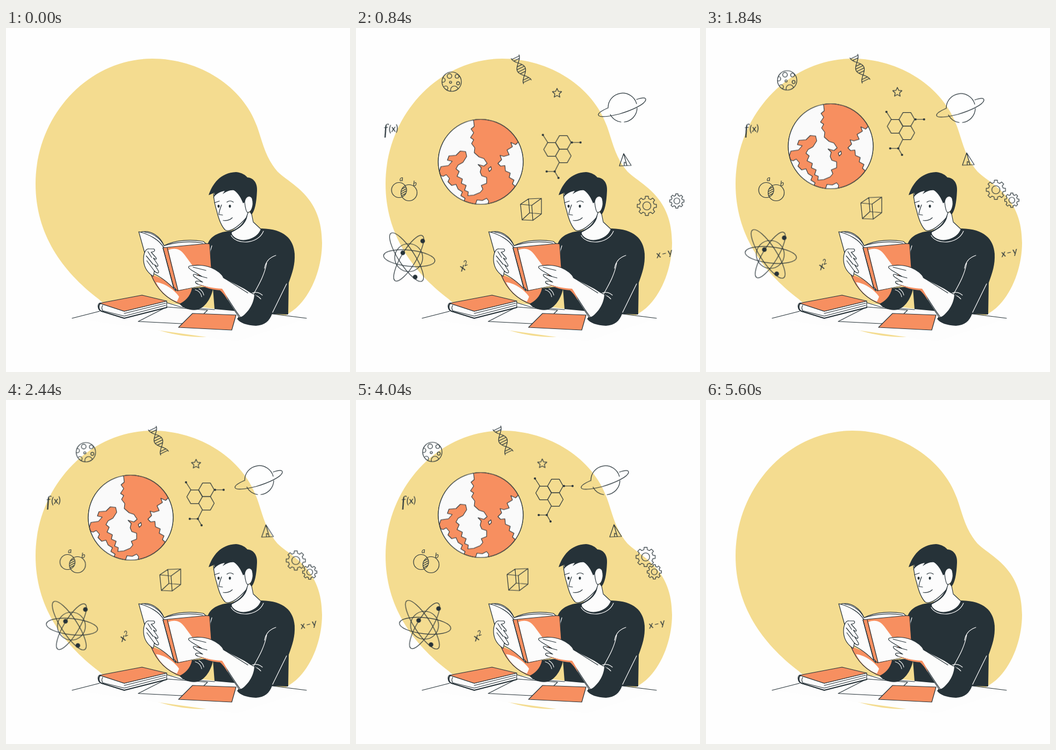
An HTML page for the animation above (6 s loop, 640 by 640 pixels).

```html
<!DOCTYPE html>
<html lang="en">
<head>
<meta charset="utf-8">
<title>Reading</title>
<style>
  html, body { margin: 0; width: 100%; height: 100%; overflow: hidden; background: #fefefe; }
  svg { display: block; width: 100vw; height: 100vh; }
  .line { fill: none; stroke: #263238; stroke-width: 1.2; stroke-linejoin: round; stroke-linecap: round; }
  .skin { fill: #fcfcfc; stroke: #263238; stroke-width: 1.2; stroke-linejoin: round; }
  .dark { fill: #263238; }
  .orange { fill: #f78f60; stroke: #263238; stroke-width: 1.2; stroke-linejoin: round; }
  .shade { fill: #f78f60; }
  .crease { fill: none; stroke: #fcfcfc; stroke-width: 1.2; stroke-linecap: round; }
  .thick { stroke-width: 2; }
  .dot { fill: #263238; stroke: none; }
  #icons text { font-family: Lato, "Open Sans", sans-serif; font-style: italic; fill: #263238; stroke: none; }
  #icons .serif { font-family: "Liberation Serif", "Noto Serif", serif; }
</style>
</head>
<body>
<svg viewBox="0 0 640 640" xmlns="http://www.w3.org/2000/svg">
  <defs>
    <clipPath id="disc"><circle cx="232" cy="217.5" r="79"/></clipPath>
    <clipPath id="moonDisc"><circle cx="146" cy="97" r="18"/></clipPath>
    <clipPath id="vennLeft"><circle cx="117" cy="301.5" r="14"/></clipPath>
    <clipPath id="vennRight"><circle cx="135.5" cy="306.5" r="15"/></clipPath>
  </defs>

  <path fill="#f4dc90" d="M55 290C55 163 153 57 272 57C360 57 441 109 467 183C478 214 482 240 505 267C530 292 588 312 588 400C588 450 565 508 526 531C490 560 440 575 368 575C340 575 315 571 290 564C240 550 200 530 172 504C104 452 55 383 55 290Z"/>

  <g id="icons" class="line">
    <g id="earth">
      <circle cx="232" cy="217.5" r="79" fill="#f78f60"/>
      <g clip-path="url(#disc)" fill="#fafafa" stroke-width="1.1">
        <g transform="translate(0 -31.5)">
          <path d="M218 165L220 183L214 188L219 195L213 204L219 208L215 215L221 223L220 232L229 240L238 243L244 252L238 257L227 254L233 260L231 268L234 275L243 278L243 289L233 293L236 300L231 306L219 311L208 312L209 305L202 302L205 293L196 289L198 281L188 276L192 267L186 262L190 255L199 250L206 239L204 230L194 229L186 237L173 238L170 246L179 248L172 256L158 258L155 267L140 268L140 165Z"/>
          <path d="M315 211L301 213L297 217L288 213L291 221L281 227L285 236L275 239L268 237L271 245L264 252L269 257L277 256L278 266L287 270L285 278L294 283L291 290L298 296L315 280Z"/>
          <path d="M150 272L162 276L168 273L174 280L171 286L178 293L186 291L190 300L198 305L195 312L203 317L200 324L180 330Z"/>
          <path d="M221 332L225 320L235 321L243 317L247 322L244 332Z"/>
          <path d="M246 262L251 258L252 263L248 267Z"/>
        </g>
      </g>
      <circle cx="232" cy="217.5" r="79"/>
    </g>

    <g id="moon">
      <circle cx="146" cy="97" r="18"/>
      <g clip-path="url(#moonDisc)">
        <circle cx="142" cy="86.500" r="4.300"/><circle cx="156" cy="87" r="3.500"/>
        <circle cx="144" cy="98" r="2"/><circle cx="158" cy="100" r="2.800"/>
        <circle cx="151" cy="112" r="7"/><circle cx="130" cy="94" r="4"/>
        <circle cx="135" cy="109" r="4"/>
      </g>
    </g>

    <path id="dna"/>
    <path id="star"/>

    <g id="planet">
      <path d="M441 150A27 27 0 0 1 494 142M495 150A27 27 0 0 1 471 176M465 176A27 27 0 0 1 445 162"/>
      <path d="M494 134C505 130 512 130 511 135C509 143 486 154 462 161C442 166 424 168 423 163C422 159 431 154 440 150"/>
    </g>

    <g id="molecule">
      <path id="rings"/>
      <path d="M343 164L334 150M386 164H404M364 202L356 218H341M356 218L363 230"/>
      <g class="dot">
        <circle cx="334" cy="150" r="2"/><circle cx="388" cy="164" r="2"/><circle cx="404" cy="164" r="2"/>
        <circle cx="341" cy="218" r="2"/><circle cx="356" cy="218" r="2"/><circle cx="363" cy="230" r="2"/>
      </g>
    </g>

    <path id="pyramid" d="M482 232L474 255L496 254ZL488 254M483 254V248L487 250"/>

    <g id="gear"><path id="gearRim"/><circle cx="539" cy="296" r="7.5"/></g>
    <g id="cog"><path id="cogRim"/><circle cx="561" cy="320" r="5.5"/></g>

    <path id="cube" d="M284 325L305 327L307 355L287 354ZM299 315L323 314L323 343L301 341ZM284 325L299 315M305 327L323 314M307 355L323 343M287 354L301 341"/>

    <g id="venn">
      <circle cx="117" cy="301.5" r="14"/><circle cx="135.5" cy="306.5" r="15"/>
      <g clip-path="url(#vennLeft)"><path id="hatch" clip-path="url(#vennRight)"/></g>
      <text x="118" y="285" font-size="13">a</text>
      <text x="143" y="294" font-size="13">b</text>
    </g>

    <g id="atom">
      <circle cx="124" cy="420" r="26"/>
      <ellipse rx="48" ry="15" transform="translate(125 421) rotate(6)"/>
      <ellipse rx="53" ry="15" transform="translate(120 419) rotate(57)"/>
      <ellipse rx="49" ry="14" transform="translate(124 421) rotate(-59)"/>
      <g class="dot"><circle cx="150" cy="389" r="4.3"/><circle cx="113" cy="411" r="4.3"/><circle cx="136" cy="456" r="4.3"/></g>
    </g>

    <g id="fx">
      <text transform="translate(79 198) rotate(-6)" font-size="18"><tspan class="serif" font-size="28">f</tspan><tspan dx="2" dy="-3">(x)</tspan></text>
    </g>
    <g id="square">
      <text transform="translate(218 450) rotate(-22)" font-size="20">x<tspan dy="-7" font-size="13">2</tspan></text>
    </g>
    <g id="minus">
      <text transform="translate(548 426) rotate(-13)" font-size="18" letter-spacing="1.5">x–y</text>
    </g>
  </g>

  <path fill="#fdfdfd" d="M123 540L173 527L299 512L385 522L490 531L560 540L430 583Z"/>
  <path class="line" d="M123 540L174 527M299 511L325 519L388 524M488 531L559 540"/>
  <path class="skin" d="M246 546L299 519L375 525L351 548L325 550Z"/>
  <path class="orange" d="M347 531L428 534L420 562L321 557Z"/>

  <g id="closedBook">
    <path class="skin" d="M174 512L220 527L299 508V520L220 540L177 527C170 524 170 514 174 512Z"/>
    <path class="orange" d="M174 512L253 497L299 508L220 527Z"/>
    <path class="line thick" d="M176 512C171 516 172 525 178 527L220 540L299 520"/>
    <path class="line" d="M180 516C178 519 178 523 180 526L220 536L297 516M220 531L297 512"/>
  </g>

  <g id="man">
    <path class="shade" d="M268 458L300 470L316 489L346 484L346 500L326 514C300 504 283 488 268 458Z"/>
    <path fill="#fcfcfc" d="M279 473C292 474 311 484 322 500L318 509C302 503 288 491 279 473Z"/>
    <path class="line" d="M270 459C281 487 300 505 326 514"/>
    <path class="dark" d="M346 484L386 480C384 497 374 518 357 524C344 527 328 521 323 513C332 509 343 500 346 484Z"/>
    <path class="dark" d="M424 377C400 378 380 385 375 403C372 430 378 465 385 485L388 523L432 527L464 497L430 541C435 549 448 553 465 554C482 553 490 545 495 532L525 533L526 474C533 455 538 440 537 420C535 392 517 374 476 373Z"/>
    <path class="crease" d="M502 423C490 427 483 435 481 447M485 437C481 460 470 478 460 496M449 498C459 494 468 497 474 504M458 493C467 490 472 493 477 497M522 476L496 529M352 487C359 489 363 494 364 500M359 485C364 488 367 492 368 497M383 405C378 418 378 432 381 443"/>
    <path class="crease" d="M419 386C428 403 468 404 479 378"/>

    <path fill="#fcfcfc" d="M420 380L448 343L457 344L460 360L474 374C466 396 430 402 420 383Z"/>
    <path class="line" d="M457 346L460 361L474 374"/>
    <path class="skin" d="M386 309C387 321 389 331 392 340C396 357 402 370 408 376C417 380 430 372 447 353L455 330L440 296L400 297Z"/>
    <path class="dark" d="M420 377C432 373 442 364 449 347C449 360 438 372 420 380Z"/>
    <path class="dark" d="M377 311C384 290 399 269 428 268C439 269 446 274 449 278C462 279 468 290 467 303C466 325 463 340 457 347C454 345 449 332 445 324L441 326C437 316 432 307 424 302C417 301 410 304 403 309L407 303C397 305 391 308 385 317L389 306Z"/>
    <path class="skin" d="M444 324C445 314 453 309 458 317C462 331 456 344 449 343C446 341 445 333 444 324Z"/>
    <path class="line" d="M401 329C398 337 396 343 396 347L403 348M404 358C411 359 417 357 421 353M388 325L397 322M411 324C415 321 419 321 423 324"/>
    <ellipse class="dark" cx="395.500" cy="331.500" rx="2" ry="2.800"/>
    <ellipse class="dark" cx="416.500" cy="331.500" rx="2" ry="2.800"/>
  </g>

  <g id="openBook">
    <path class="skin" d="M249 380C270 374 288 389 294 405C315 394 345 393 367 397L373 402L300 412Z"/>
    <path class="line" d="M258 380C276 382 288 393 294 405C318 398 342 396 366 400"/>
    <path class="skin" d="M247 379C267 384 285 394 293 408L316 489C300 471 286 461 268 454Z"/>
    <path class="orange" d="M292 409L300 408L374 401L379 402L382 446L366 479L319 489L312 482Z"/>
    <path fill="#fcfcfc" d="M302 413C315 408 325 411 333 423L352 449L366 479L320 488Z"/>
    <path class="line" d="M300 409L320 488M292 409L312 484"/>
    <path class="skin" d="M256 433C255 420 260 410 266 411L275 411C279 414 275 417 270 417L277 425C282 430 280 432 274 428L281 438C285 443 282 446 276 440L283 451C286 456 282 458 276 452L274 462C263 455 257 445 256 433Z"/>
    <path class="line" d="M264 416L271 427M261 424L274 440M262 433L276 452"/>
    <path class="skin" d="M341 443C353 440 370 441 382 446C394 451 402 458 406 466L411 482L466 498C467 517 452 535 434 539L400 487C383 486 368 480 358 477C350 474 351 470 359 471L366 473L352 464C345 459 349 456 356 460L364 462L346 451C340 447 338 445 341 443Z"/>
    <path fill="#fcfcfc" d="M404 465L443 485C451 490 458 495 466 499L438 536L405 488Z"/>
    <path class="line" d="M404 464L450 493M402 487C414 505 426 525 436 538M348 445L372 451M356 460L374 465"/>
    <path class="shade" d="M358 477C370 483 384 487 398 488C406 495 410 502 413 507C411 499 407 492 402 485C390 485 371 481 358 477Z"/>
    <path class="dark" d="M462 496C470 501 472 511 465 522C456 534 444 541 430 542C445 536 461 517 462 496Z"/>
  </g>
</svg>

<script>
const LOOP = 6000;
const $ = id => document.getElementById(id);
const draw = (id, d) => $(id).setAttribute('d', d);
const poly = pts => 'M' + pts.map(p => p.map(v => v.toFixed(1)).join(' ')).join('L');
const polar = (x, y, r, a) => [x + r * Math.cos(a), y + r * Math.sin(a)];
const range = (n, f) => Array.from({ length: n }, (_, i) => f(i));

function gear(x, y, r, teeth) {
  const step = Math.PI * 2 / teeth;
  const edge = [[-.3, .77], [-.2, 1], [.2, 1], [.3, .77]];
  return poly(range(teeth, i => edge.map(([a, k]) => polar(x, y, r * k, (i + a) * step))).flat()) + 'Z';
}

function helix(x, y, ux, uy, len, w) {
  const at = (s, side) => {
    const k = side * w * Math.cos(s * Math.PI * 2);
    return [x + ux * len * s - uy * k, y + uy * len * s + ux * k];
  };
  const strand = side => poly(range(25, i => at(i / 24, side)));
  const rungs = [.04, .12, .36, .45, .54, .63, .88, .96].map(s => poly([at(s, 1), at(s, -1)]));
  return strand(1) + strand(-1) + rungs.join('');
}

draw('dna', helix(269, 52, .44, .9, 52, 8));
draw('star', poly(range(10, i => polar(351, 119, i % 2 ? 4.2 : 9, (i / 5 - .5) * Math.PI))) + 'Z');
draw('rings', [[350, 177], [372, 164], [372, 189]]
  .map(([x, y]) => poly(range(6, i => polar(x, y, 14.5, i * Math.PI / 3))) + 'Z').join(''));
draw('gearRim', gear(539, 296, 18, 8));
draw('cogRim', gear(561, 320, 13.5, 8));
draw('hatch', range(9, i => `M118 ${290 + i * 4}l18 -10`).join(''));

// id: direction, then distances from rest at 840, 1840, 4040 and 4680 ms
const drift = {
  earth: [0, 1, 31.5, 2.5, -3.5, -12.5],
  moon: [1, .09, 32, 5, -4, -12],
  dna: [1, .05, 27, 6, -7, -15],
  star: [1, .1, 23, 5, -4.5, -9.5],
  planet: [1, -.04, 28, 6, -4, -9],
  molecule: [.28, 1, 49, 6, -4, -11],
  pyramid: [1, .1, 16, 3, -2, -6],
  gear: [.06, 1, 35, 5, -4, -12],
  cog: [1, .05, 36, 8, -6, -16],
  cube: [1, .13, 22, 4, -3, -8],
  venn: [1, 0, -37, -5, 4, 10],
  atom: [1, -.28, -26, -4.5, 3.5, 8.5],
  fx: [1, 0, -27, -7, 6, 13],
  square: [1, -.15, -22, -5, 4, 8],
  minus: [1, .2, 12, 2.5, -2, -6]
};

// time and the easing that leaves it
const steps = [
  [0, 'linear'],
  [560, 'cubic-bezier(.333,.45,.667,.78)'],
  [840, 'cubic-bezier(.333,.9,.667,.96)'],
  [1840, 'linear'],
  [3080, 'linear'],
  [4040, 'cubic-bezier(.333,.14,.667,.3)'],
  [4680, 'cubic-bezier(.333,.17,.667,.4)'],
  [5120, 'linear'],
  [LOOP, 'linear']
];

const timing = { duration: LOOP, iterations: Infinity };

for (const [id, [dx, dy, a, b, c, d]] of Object.entries(drift)) {
  const path = [2 * a, 2 * a, a, b, 0, c, d, -1.1 * a, -1.1 * a];
  $(id).animate(steps.map(([t, easing], i) => ({
    offset: t / LOOP,
    easing,
    transform: `translate(${dx * path[i]}px, ${dy * path[i]}px)`
  })), timing);
}

$('icons').animate(
  [[0, 0], [600, 0], [800, 1], [4880, 1], [5100, 0], [LOOP, 0]]
    .map(([t, opacity]) => ({ offset: t / LOOP, opacity })), timing);
</script>
</body>
</html>
```
